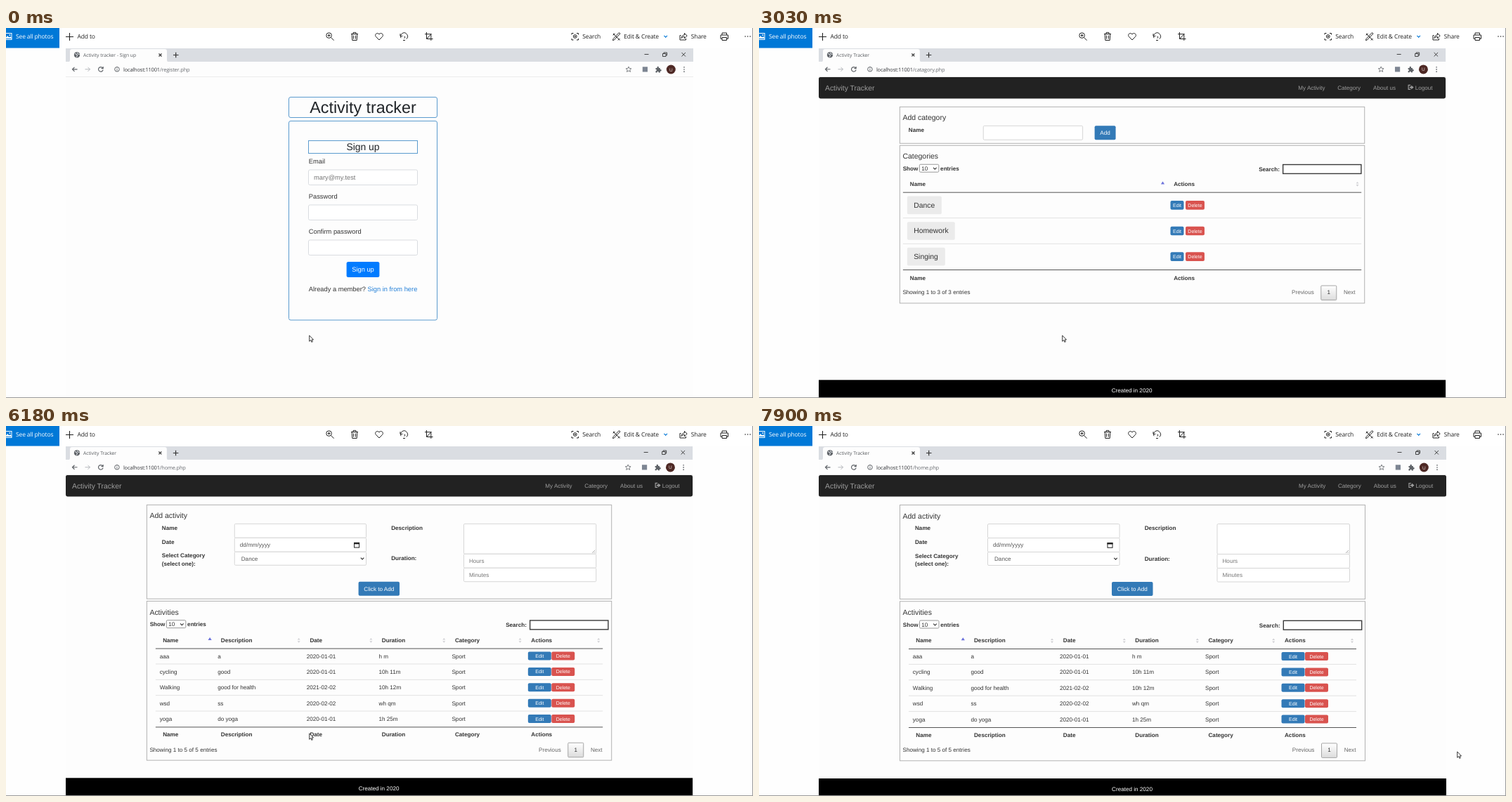
Recreate the animation shown at these times as an HTML page. Size 1063x527 px, loop 8000 ms.

```html
<!DOCTYPE html>
<html lang="en">
<head>
<meta charset="utf-8">
<title>Activity tracker</title>
<style>
html, body { margin: 0; width: 100%; height: 100%; overflow: hidden; background: #fff; }
svg { display: block; width: 1063px; height: 527px; }
text { font-family: "Liberation Sans", Arial, sans-serif; text-rendering: geometricPrecision; white-space: pre; }
.ui { font-family: "Open Sans", "Noto Sans", sans-serif; }
.bar { font-size: 8.5px; letter-spacing: -.15px; }
.url { font-size: 7.5px; letter-spacing: -.2px; }
</style>
</head>
<body>
<svg id="stage" viewBox="0 0 1063 527"></svg>
<script>
const INK = '#333', BLUE = '#337ab7', RED = '#d9534f', SIGN = '#007bff';

const rect = (x1, y1, x2, y2, fill, stroke = 'none', r = 0, sw = 1) =>
  `<rect x="${x1}" y="${y1}" width="${x2 - x1}" height="${y2 - y1}" rx="${r}" fill="${fill}" stroke="${stroke}" stroke-width="${sw}"/>`;
const text = (x, y, s, size = 8.15, fill = INK, extra = '') =>
  `<text x="${x}" y="${y}" font-size="${size}" fill="${fill}" ${extra}>${s}</text>`;
const bold = (x, y, s) => text(x, y, s, 8.15, INK, 'font-weight="bold"');
const mid = (x, y, s, size, fill) => text(x, y, s, size, fill, 'text-anchor="middle"');
const ui = (x, y, s, cls, fill, size = 7) => text(x, y, s, size, fill, `class="ui ${cls}"`);
const path = (d, stroke = INK, sw = 1, fill = 'none') =>
  `<path d="${d}" stroke="${stroke}" stroke-width="${sw}" fill="${fill}"/>`;
const line = (x1, x2, y, stroke = '#e2e2e2') => path(`M${x1} ${y}H${x2}`, stroke);
const dot = (x, y, r, fill) => `<circle cx="${x}" cy="${y}" r="${r}" fill="${fill}"/>`;
const ring = (x, y, r, stroke = '#222', sw = 1) =>
  `<circle cx="${x}" cy="${y}" r="${r}" fill="none" stroke="${stroke}" stroke-width="${sw}"/>`;
const button = (x1, y1, x2, y2, s, fill = BLUE, size = 8.15, r = 2) =>
  rect(x1, y1, x2, y2, fill, 'none', r) + mid((x1 + x2) / 2, (y1 + y2) / 2 + size * .36, s, size, '#fff');
const field = (x1, y1, x2, y2, s = '', fill = '#777') =>
  rect(x1, y1, x2, y2, '#fff', '#d6d6d6', 1.5) + text(x1 + 7.5, (y1 + y2) / 2 + 2.8, s, 8.15, fill);
const panel = (y1, y2) => rect(200.5, y1, 862.5, y2, '#fdfdfd', '#b2b2b2');
const chevron = (x, y, c = '#333') => path(`M${x - 2.3} ${y - 1.1}l2.3 2.3l2.3-2.3`, c, 1.1);
const sorter = (x, y) => path(`M${x - 2} ${y - .8}l2-2.6l2 2.6zM${x - 2} ${y + .8}l2 2.6l2-2.6z`, 'none', 0, '#d0d0d4');
const sorted = (x, y) => path(`M${x - 2.6} ${y}l2.6-4l2.6 4z`, 'none', 0, '#6c72dc');

// Photo viewer toolbar
function viewerBar() {
  const k = '#222';
  return rect(0, 0, 1063, 29, '#fff') + rect(0, 0, 76, 28.5, '#0078d7') +
    rect(-2, 7.5, 8, 16.5, 'none', '#fff') + path('M-1 15l3-4l2.5 2.5l1.5-1.5l2.5 3z', 'none', 0, '#fff') + dot(5.4, 10, .9, '#fff') +
    ui(14, 15, 'See all photos', 'bar', '#fff') +
    path('M85 12.5h11M90.5 7v11', k, 1.1) + ui(101.5, 15, 'Add to', 'bar', k) +
    ring(459.6, 10.6, 3.8) + path('M462.4 13.5l4.2 4.2M457.6 10.6h4M459.6 8.6v4', k) +
    path('M491 8.5h10M494 8v-1.6h4V8M492.2 8.5l.6 9h6.4l.6-9M494.6 10.5v5M497.4 10.5v5', k) +
    path('M531 17l-4.6-4.7c-2.6-3.2 2-6.8 4.6-3.4c2.6-3.4 7.2.2 4.6 3.4z', k) +
    path('M562 14.2a5 5 0 1 1 7.8 1.4M561 8.2v3.2h3.4M568 17.5h-3M566.5 11.8l1.6 1.4l-1.6 1.4', k) +
    path('M598.5 6v9.5h9M596 8.7h8.8V18M599 15l6.5-7', k) +
    path('M805 9.5v-2h2.5M812 7.5h2.5v2M814.5 15v2H812M807.5 17H805v-2', k) + ring(809.8, 12, 2.4) + dot(809.8, 12, 1, k) +
    ui(820.3, 15, 'Search', 'bar', k) +
    path('M864 8l9.5 9.5M865.5 17l8.5-9l-1.6-1.4l-8.4 9l-.5 2zM864 10.5l2.3-2.8M871 17.5l2.5-2.6', k) +
    ui(879.3, 15, 'Edit &amp; Create', 'bar', k) + chevron(938.7, 12, '#0078d7') +
    path('M960.5 10.5H959V17h8.5v-2M961 14.5c.4-3.2 2.2-4.6 4.5-4.6V7.4l3.7 3.8l-3.7 3.6v-2.4c-2 0-3.3.6-4.5 2.1z', k) +
    ui(974.8, 15, 'Share', 'bar', k) +
    path('M1019 10V7h6.500v3M1018.800 15.300H1017V10h10.500v5.300h-2M1019 13.500h6.500v4h-6.500z', k) +
    [1052, 1055.5, 1059].map(x => dot(x, 12, .8, k)).join('');
}

function browser(title, file) {
  const k = '#5f6368';
  return rect(85, 29, 978, 530, '#fdfdfd') + rect(85, 29, 978, 48.5, '#dadde2') +
    path('M88 48.500q3 0 3-3V33q0-3 3-3H226q3 0 3 3v12.500q0 3 3 3z', 'none', 0, '#fdfdfd') +
    rect(85, 48, 978, 69, '#fdfdfd') + line(85, 978, 69.5, '#ececec') +
    dot(101, 38.3, 4.1, k) + path('M98 36.500l2.500 1l1 2l-1.500 2M101.500 35l1 2l2.300.500', '#dadde2', 1.1) +
    ui(110, 40.8, title, '', '#55585c', 6.75) +
    path('M217.500 36.500l4 4m0-4l-4 4', '#333', 1.1) + path('M238 38.500h7.500M241.700 34.800v7.500', '#333', 1.2) +
    path('M908.500 37.500h6M934.500 36.500h4.500v4h-4.500zM936 36.500v-1.500h4.500v4H939M961.500 35l5.500 5.500m0-5.500l-5.500 5.500', '#333', .9) +
    path('M101.500 58.800h-7m3-3l-3 3l3 3', k, 1.2) + path('M112.500 58.800h7m-3-3l3 3l-3 3', '#b5b8bc') +
    path('M137.600 57a3.300 3.300 0 1 0 .500 2.600M138.200 55v2.600h-2.600', k, 1.2) +
    ring(158, 58.8, 3.3, k) + path('M158 58.300v2.400M158 56.600v1', k, .9) +
    text(167, 61.7, `localhost:11001<tspan fill="#6b6e73">/${file}.php</tspan>`, 7.5, '#35373b', 'class="ui url"') +
    path('M886 55l1.100 2.600l2.800.200l-2.100 1.800l.700 2.800l-2.500-1.500l-2.500 1.500l.700-2.800l-2.100-1.800l2.800-.200z', k, .8) +
    rect(905.8, 55.3, 913, 62.5, '#7d8592') +
    path('M924.500 57h2q-.500-2.300 1.200-2.300t1.200 2.300h2v2q1.800-.400 1.800 1.200t-1.800 1.200v2h-2.200q0-1.600-1.100-1.600t-1.100 1.600h-2v-2.200q1.500 0 1.500-1.100t-1.500-1.100z', 'none', 0, k) +
    dot(946.3, 59, 6.5, '#4e2925') + mid(946.3, 61.5, 'U', 6.5, '#e5d8d6') +
    [55.8, 59, 62.2].map(y => dot(965, y, .85, k)).join('');
}

function signPage(o) {
  const edge = '#5b9bce', R = o.right;
  const inputs = o.labels.map((s, i) => {
    const y = 193 + 50 * i;
    return text(430.8, y, s, 9.3) + rect(430.5, y + 9, R - 28, y + 30.5, '#fff', '#d9dce0', 2);
  }).join('');
  const y = 183 + 50 * o.labels.length;
  const c = (402.5 + R) / 2;
  return browser('Activity tracker - ' + o.name, o.file) +
    rect(402.5, 98.5, R, 127.5, '#fdfdfd', edge, 2.5) + mid(c, 120.5, 'Activity tracker', 23.3, '#212529') +
    rect(402.5, 132.5, R, y + 83, '#fdfdfd', edge, 2.5) +
    rect(430.5, 160.5, R - 28, 178.5, '#fdfdfd', edge) + mid(c, 174, o.name, 13.9, '#212529') +
    inputs + text(438, 216, 'mary@my.test', 9.3, '#777') +
    button(c - o.half, y, c + o.half, y + 22, o.name, SIGN, 9.3, 2.5) +
    text(430.8, y + 41.7, `${o.ask} <tspan fill="#2480d8">${o.link}</tspan>`, 9.3);
}

function tracker(file, body) {
  const g = '#9d9d9d';
  return browser('Activity Tracker', file) + rect(85, 70, 978, 100.5, '#222', 'none', 2.5) +
    text(94, 89, 'Activity Tracker', 10.4, g) +
    text(768, 88, 'My Activity', 8.1, g) + text(824, 88, 'Category', 8.1, g) + text(874.8, 88, 'About us', 8.1, g) +
    path('M928 81.500h-3v6h3', g, 1.2) + path('M926.800 83.500h2.200v-2l3.500 3l-3.500 3v-2h-2.200z', 'none', 0, g) +
    text(934.5, 88, 'Logout', 8.1, g) + body +
    rect(85, 502, 978, 530, '#000') + mid(531, 519.6, 'Created in 2020', 8.15, '#fff');
}

const listTools = y => bold(204.8, y, 'Show') + rect(228.5, y - 8.5, 256, y + 2.5, '#fff', '#999', 1.5) +
  text(231.3, y, '10') + chevron(250.5, y - 2.7) + bold(258.3, y, 'entries') +
  bold(711.8, y + 1.3, 'Search:') + rect(746.3, y - 8.2, 857.7, y + 4.7, '#fff', '#3a3a3a', 0, 1.4);

const pager = (y, n) => text(204.5, y, `Showing 1 to ${n} of ${n} entries`) +
  text(758.8, y, 'Previous', 8.15, '#666') + rect(800.5, y - 12.5, 822.5, y + 8, 'url(#page)', '#a5a5a5', 1) +
  mid(811.5, y, '1') + text(832.7, y, 'Next', 8.15, '#666');

function categories() {
  const rows = [['Dance', 260], ['Homework', 279], ['Singing', 265]].map(([s, x2], i) => {
    const y = 252.7 + 36.7 * i;
    return rect(211, y - 12.8, x2, y + 12.8, '#ebebeb', 'none', 2) + text(220.3, y + 3.5, s, 10.4) +
      button(586, y - 6.3, 605, y + 6.3, 'Edit', BLUE, 7) + button(607.5, y - 6.3, 634.5, y + 6.3, 'Delete', RED, 7) +
      (i < 2 ? line(205, 858, y + 18.3) : '');
  }).join('');
  return panel(112.5, 164.5) + text(204.5, 131.6, 'Add category', 10.5) + bold(213, 148, 'Name') +
    field(319.5, 139.5, 461, 159.5) + button(478, 139.5, 508, 159.5, 'Add') +
    panel(167.5, 392.5) + text(204.5, 186, 'Categories', 10.5) + listTools(203) +
    bold(215, 225.3, 'Name') + sorted(575, 222.8) + bold(590.7, 225.3, 'Actions') + sorter(852.3, 222.6) +
    line(205, 858, 234.5, '#555') + rows + line(205, 858, 345, '#555') +
    bold(215, 359, 'Name') + bold(590.7, 359, 'Actions') + pager(380, 3);
}

function activities() {
  const heads = [['Name', 223.3], ['Description', 306], ['Date', 432.8], ['Duration', 535.3], ['Category', 639.5], ['Actions', 748]];
  const titles = y => heads.map(([s, x]) => bold(x, y, s)).join('');
  const cols = [218.8, 301.4, 428, 531, 635];
  const rows = ['aaa|a|2020-01-01|h m', 'cycling|good|2020-01-01|10h 11m', 'Walking|good for health|2021-02-02|10h 12m',
    'wsd|ss|2020-02-02|wh qm', 'yoga|do yoga|2020-01-01|1h 25m'].map((row, i) => {
    const y = 328 + 22.4 * i;
    return (row + '|Sport').split('|').map((s, j) => text(cols[j], y + 3, s)).join('') +
      button(743.5, y - 6, 776.5, y + 6, 'Edit', BLUE, 7) + button(777, y - 6, 810, y + 6, 'Delete', RED, 7) +
      (i < 4 ? line(213, 850, y + 11.4) : '');
  }).join('');
  return panel(112.5, 246.5) + text(204.5, 131.6, 'Add activity', 10.5) +
    bold(222, 148, 'Name') + bold(222, 168, 'Date') + bold(222, 187.5, 'Select Category') + bold(222, 199, '(select one):') +
    field(325.5, 139.5, 513, 159.5) + field(325.5, 159.5, 513, 179.5, 'dd/mm/yyyy', '#555') +
    rect(496, 166.8, 503, 173.3, '#fff', '#222') + rect(495.5, 166, 503.5, 168.5, '#222') +
    field(325.5, 179.5, 513, 198.5) + text(335, 192, 'Dance', 8.15, '#555') + chevron(507.5, 189) +
    bold(548.7, 148, 'Description') + bold(548.7, 191.5, 'Duration:') +
    field(652, 139.5, 840.5, 182.5) + path('M835 181l4-4M837.500 181l1.500-1.500', '#888', .7) +
    field(652, 182.5, 840.5, 202.5, 'Hours') + field(652, 202.5, 840.5, 222, 'Minutes') +
    button(502, 222, 560.5, 242, 'Click to Add') +
    panel(249.8, 476.8) + text(204.5, 269, 'Activities', 10.5) + listTools(285.5) +
    titles(308) + sorted(290.3, 305.3) + [417, 519.8, 623.8, 732.2, 844].map(x => sorter(x, 305.8)).join('') +
    line(213, 850, 317.5, '#555') + rows + line(213, 850, 429.5, '#555') + titles(443) + pager(464.4, 5);
}

const pages = {
  up: signPage({ name: 'Sign up', file: 'register', right: 613.5, half: 23.4, labels: ['Email', 'Password', 'Confirm password'],
    ask: 'Already a member?', link: 'Sign in from here' }),
  in: signPage({ name: 'Sign in', file: 'index', right: 614.3, half: 21.7, labels: ['Email', 'Password'],
    ask: 'Not registered yet?', link: 'Sign up from here' }),
  cat: tracker('catagory', categories()),
  home: tracker('home', activities())
};

const stage = document.getElementById('stage');
stage.innerHTML = '<defs><linearGradient id="page" x2="0" y2="1"><stop stop-color="#fff"/><stop offset="1" stop-color="#dcdcdc"/></linearGradient></defs>' +
  rect(0, 0, 1063, 527, '#fefefe') +
  Object.entries(pages).map(([id, s]) => `<g id="${id}">${s}</g>`).join('') + viewerBar() +
  rect(1062, 0, 1063, 527, '#999') + rect(0, 526, 1063, 527, '#999') +
  '<circle id="click" cx="432" cy="438" r="6" fill="#ff0" fill-opacity=".47"/>' +
  '<g id="cursor">' + path('M.700 .900V9.300L2.600 7.500L3.900 10.400L5.300 9.800L4 7H6.500z', '#222', .9, '#fff') + '</g>';

const LOOP = 8000;
// [start, page, slightly shrunk while it settles]
const views = [[0, 'up'], [1510, 'in', 1], [1670, 'in'], [3030, 'cat', 1], [3910, 'cat'], [6180, 'home', 1], [6460, 'home']];
// [start, x, y]
const moves = [[0, 431, 437], [6870, 428, 435], [7020, 429, 435], [7170, 440, 443], [7320, 481, 450], [7750, 747, 458], [7900, 993, 463]];
const at = (steps, t) => steps.filter(s => s[0] <= t).pop();
const el = id => document.getElementById(id);

function draw(now) {
  const t = now % LOOP;
  const [, name, small] = at(views, t);
  for (const id in pages) el(id).style.display = id === name ? '' : 'none';
  el(name).setAttribute('transform', small ? 'translate(85 29) scale(.999 .9985) translate(-85 -29)' : '');
  const [, x, y] = at(moves, t);
  el('cursor').setAttribute('transform', `translate(${x} ${y})`);
  el('click').style.display = t >= 500 && t < 650 ? '' : 'none';
}

const start = performance.now();
function tick() {
  draw(performance.now() - start);
  requestAnimationFrame(tick);
}
tick();
</script>
</body>
</html>
```
